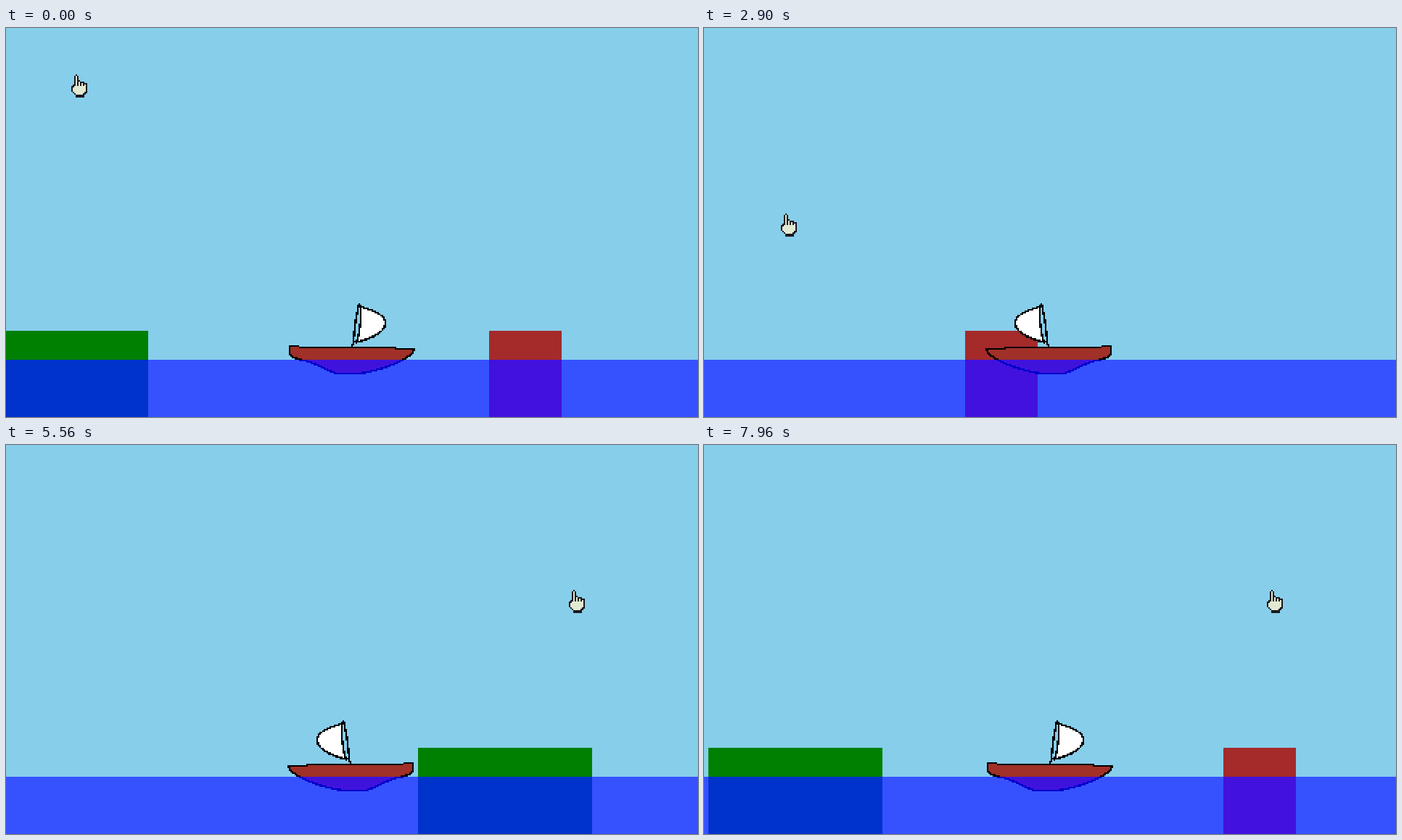
An HTML page with a canvas for the animation above (8 s loop, 954 by 537 pixels).

```html
<!DOCTYPE html>
<html lang="en">
<head>
<meta charset="utf-8">
<title>Sailing boat</title>
<style>
  html, body { margin: 0; width: 100%; height: 100%; overflow: hidden; background: #87ceeb; }
  canvas { display: block; width: 954px; height: 538px; image-rendering: pixelated; }
</style>
</head>
<body>
<canvas id="stage" width="477" height="269"></canvas>
<script>
// One canvas pixel covers 2 x 2 stage pixels; positions below are in stage pixels.
const LOOP = 8000, TICK = 68;
const ctx = document.getElementById('stage').getContext('2d');

// Each move: first and last step time, then the position reached
const land = { start: [-44], moves: [
  [1140, 2280, -510], [2550, 4750, 380], [5150, 6040, 758], [6110, 7960, 6]
] };
const pointer = { start: [90, 64], moves: [
  [460, 530, 210, 74], [600, 740, 106, 256],
  [3390, 3660, 390, 250], [3730, 4130, 578, 76], [4340, 4750, 776, 200]
] };

// Stepped position in canvas pixels, and whether the last move went right
function sample({ start, moves }, t) {
  let pos = start, movedRight = false;
  for (const [first, last, ...to] of moves) {
    if (t < first) break;
    const gaps = Math.round((last - first) / TICK);
    const done = Math.min(gaps, Math.floor((t - first) / (last - first) * gaps + 0.15));
    const k = (done + 1) / (gaps + 1);
    movedRight = to[0] > pos[0];
    pos = pos.map((v, i) => v + (to[i] - v) * k);
  }
  return { pos: pos.map(v => Math.floor(v / 2 + 1e-6)), movedRight };
}

function rect(g, color, x, y, w, h) {
  g.fillStyle = color;
  g.fillRect(x, y, w, h);
}

// Fills and outlines a path without smoothing; fill may be null
function shape(g, fill, line, width, d) {
  const path = new Path2D(d);
  g.lineWidth = width;
  g.lineCap = 'square';
  for (let y = 0; y < g.canvas.height; y++)
    for (let x = 0; x < g.canvas.width; x++) {
      const color = g.isPointInStroke(path, x + 0.5, y + 0.5) ? line
        : fill && g.isPointInPath(path, x + 0.5, y + 0.5) ? fill : null;
      if (color) rect(g, color, x, y, 1, 1);
    }
}

function sprite(width, height, paint) {
  const canvas = Object.assign(document.createElement('canvas'), { width, height });
  paint(canvas.getContext('2d'));
  return canvas;
}

const boat = sprite(87, 49, g => {
  const hull = 'M.5 29.5H6.5L7.5 30.5H72.5L74 31.5H86.5C84.5 39 62.5 46.5 48.5 48.5H33.5' +
    'C27.5 47.5 22.5 42.5 10.5 39.5Q.5 37.5 .5 34Z';
  const sail = 'M49.5 2.5C72 8 73 20 46.5 27Q50 17 49.5 2.5Z';
  const mast = 'M50 2.5L48.5 .5Q45.5 11 44.5 27L43.5 30M44.5 26.5H46.5';
  shape(g, '#a03028', '#000', 1.4, hull);
  shape(g, '#fff', '#000', 1.4, sail);
  shape(g, null, '#000', 1.4, mast);
});

const hand = sprite(11, 16, g => {
  const palm = 'M3.5 .5L2.5 1.5V7.5L.5 8.5V11.5L3.5 14.5H8.5L10.5 11.5V6.5L4.5 4.5V1.5Z';
  const fingers = 'M4.5 4.5V7.5M6.5 5.5V7.5M8.5 6.5V7.5';
  const wrist = 'M3.5 14.5h5v1h-5z';
  shape(g, '#e2ead2', '#1c1820', 1.2, palm + fingers + wrist);
});

function draw(t) {
  const { pos: [x], movedRight } = sample(land, t);
  rect(ctx, '#87ceeb', 0, 0, 477, 269);
  rect(ctx, '#008000', x, 209, 120, 60);
  rect(ctx, '#a52a2a', x + 355, 209, 50, 60);

  ctx.save();
  if (movedRight) ctx.transform(-1, 0, 0, 1, 476, 0);
  ctx.drawImage(boat, 195, 190);
  ctx.restore();

  // Water darkens what is below it and adds blue
  rect(ctx, 'rgba(0,0,0,.6)', 0, 229, 477, 40);
  ctx.globalCompositeOperation = 'lighter';
  rect(ctx, 'rgb(0,0,204)', 0, 229, 477, 40);
  ctx.globalCompositeOperation = 'source-over';

  ctx.drawImage(hand, ...sample(pointer, t).pos);
}

const begin = performance.now();
function frame() {
  draw((performance.now() - begin) % LOOP);
  requestAnimationFrame(frame);
}
frame();
</script>
</body>
</html>
```
